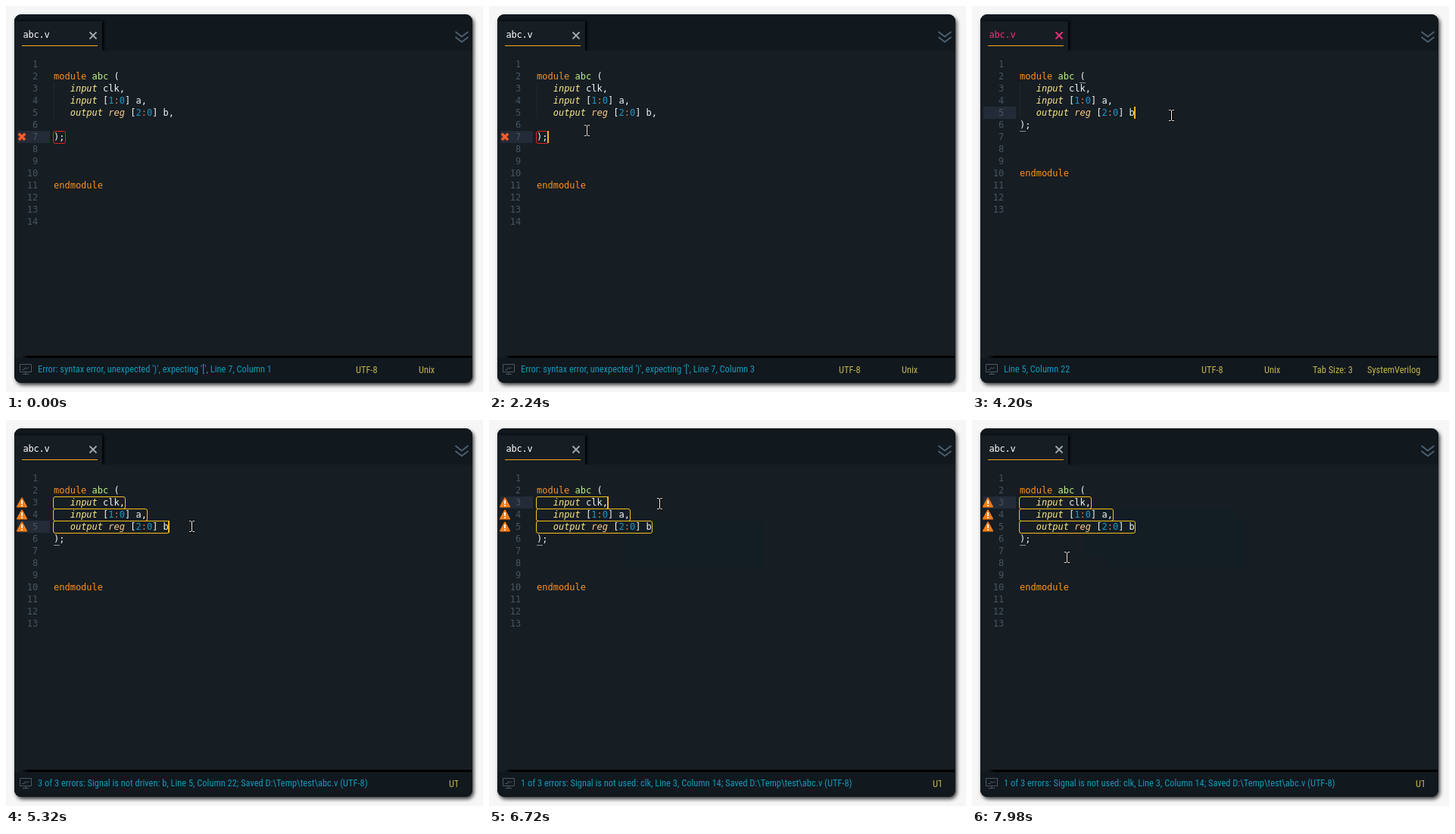
An HTML page that plays this animation: 630 px wide and 510 px high, repeating every 8 s.

```html
<!DOCTYPE html>
<html lang="en">
<head>
<meta charset="utf-8">
<title>Verilog linting in an editor</title>
<style>
html, body { margin: 0; width: 100%; height: 100%; overflow: hidden; background: #f6f6f6; }
#stage { position: relative; width: 630px; height: 510px; overflow: hidden; }
#stage * { box-sizing: border-box; }
#stage div, #stage pre, #stage svg, #bar span { position: absolute; margin: 0; }
svg { overflow: visible; }
pre, .mono { font: 12px/16px "DejaVu Sans Mono", "Liberation Mono", monospace; white-space: pre; }
#win { left: 11px; top: 11px; width: 605px; height: 487px; border-radius: 9px; background: #161d23; box-shadow: 2px 3px 5px rgba(0,0,0,.75); }
#tabs { left: 11px; top: 11px; width: 605px; height: 48px; border-radius: 9px 9px 0 0; background: #11181e; overflow: hidden; }
#tab { left: 0; top: 9px; width: 116px; height: 39px; background: #161d23; box-shadow: 2px 0 3px #000; }
#name { left: 22.5px; top: 30px; letter-spacing: -.22px; color: #fff; }
#rule { left: 21px; top: 52px; width: 100px; height: 1px; background: #f5a81c; }
#edge { left: 20px; top: 462px; width: 595px; height: 3px; background: linear-gradient(90deg, transparent, #000 10px); }
#foot { left: 11px; top: 465px; width: 605px; height: 33px; border-radius: 0 0 9px 9px; background: #11181e; }
#nums { left: 12px; top: 69px; width: 30.2px; text-align: right; color: #48555f; }
#code { left: 63px; top: 69px; color: #f4f6f5; }
#active { left: 15px; width: 43px; height: 16px; background: #222b37; }
#guide { left: 63px; top: 101px; width: 1px; height: 48px; background: repeating-linear-gradient(#2b353d 0 1px, transparent 1px 2px); }
.kw { color: #ff901e; } .id { color: #bdf08a; } .num { color: #1c97c8; } .op { color: #d97a45; }
.dir { color: #fbe88c; font-style: italic; } .reg { color: #ffc98a; font-style: italic; }
.box { left: 62px; height: 17px; border: 1px solid #f3c11c; border-radius: 3px; }
.under { width: 8px; height: 1px; background: #8d9796; }
#err .box { border-color: #e3221b; }
#caret { width: 1.5px; height: 16px; background: #f9b41d; }
.tip { height: 63px; background: #22282e; color: #f2f2f2; letter-spacing: -.22px; }
.tip b { position: absolute; left: 13px; top: 13px; }
.tip i { position: absolute; left: 23px; top: 34px; font-style: normal; }
.tip.blank { background: #1b2228; }
.tip.blank > * { display: none; }
.ghost { height: 63px; background: #121e24; }
#bar { left: 0; top: 472px; width: 597px; height: 20px; overflow: hidden; white-space: pre;
  font: 12.4px/16px "Roboto Condensed", Roboto, sans-serif; font-stretch: 75%; }
#bar.wide { font-size: 12px; letter-spacing: -.38px; }
#msg { left: 42px; color: #1299ba; }
#bar .info { top: 1px; color: #c3b451; }
</style>
</head>
<body>
<div id="stage">
  <div id="win"></div>
  <div id="tabs"><div id="tab"></div></div>
  <div id="name" class="mono">abc.v</div>
  <svg id="close" style="left:110px;top:34px" width="10" height="10" fill="none" stroke-width="1.8"><path d="M.5 .5 9.5 9.5M9.5 .5 .5 9.5"/></svg>
  <div id="rule"></div>
  <svg style="left:593px;top:33px" width="18" height="16" fill="none" stroke="#4b5f70" stroke-width="2"><path d="M.5 1 9 7.5 17.5 1M.5 8 9 14.5 17.5 8"/></svg>
  <div id="edge"></div>
  <div id="foot"></div>

  <div class="ghost" id="ghostA" style="left:178px;top:133px;width:183px"></div>
  <div class="ghost" id="ghostB" style="left:149px;top:117px;width:197px"></div>
  <div id="active"></div>
  <div id="guide"></div>
  <pre id="nums"></pre>
  <pre id="code"></pre>
  <div id="pair">
    <div class="under" style="left:142px;top:101px"></div>
    <div class="under" id="closeMark" style="left:63px"></div>
  </div>
  <div id="err">
    <svg style="left:15px;top:167px" width="12" height="12"><path d="M2 2 10 10M10 2 2 10" stroke="#a92c12" stroke-width="4.4"/><path d="M1.8 1.6 10 9.8M10.2 1.6 2 9.8" stroke="#f2602c" stroke-width="3"/></svg>
    <div class="box" style="top:165px;width:17px"></div>
  </div>
  <div id="warns"></div>
  <div id="caret"></div>
  <div class="tip mono" id="tipA" style="left:178px;top:133px;width:183px"><b>Line 3</b><i>Signal is not used: a</i></div>
  <div class="tip mono" id="tipB" style="left:149px;top:117px;width:197px"><b>Line 2</b><i>Signal is not used: clk</i></div>

  <svg style="left:18px;top:473px" width="16" height="14" fill="none" stroke="#4d5962"><path d="M.5 .5h15v10h-15zM8 10.500v3M4 13.500h8M3 7.500h3l1.500-3 1.500 2 1.500-1.500h2"/></svg>
  <div id="bar"><span id="msg"></span></div>
  <svg id="mouse" width="9" height="17" fill="none"><path id="beam" d="M1 1.500H3.500L4.500 2.500 5.500 1.500H8M4.500 2V15M1 15.500H3.500L4.500 14.500 5.500 15.500H8" stroke="#000" stroke-width="3"/><use href="#beam" style="display:none"/><path d="M1 1.500H3.500L4.500 2.500 5.500 1.500H8M4.500 2V15M1 15.500H3.500L4.500 14.500 5.500 15.500H8" stroke="#fff"/></svg>
</div>
<script>
const LOOP = 8000, STEP = 140, CHAR = 7.224;
const $ = id => document.getElementById(id);
const rowTop = line => 69 + 16 * (line - 1);
const show = (id, on) => { $(id).style.display = on ? '' : 'none'; };
const within = (t, a, b) => t >= a && t < b;

const source = ['', 'module abc (', '   input clk,', '   input [1:0] a,', '   output reg [2:0] b,',
  '', ');', '', '', '', 'endmodule', '', '', ''];
const noComma = source.map((s, i) => i === 4 ? s.slice(0, -1) : s);
const joined = noComma.filter((s, i) => i !== 5);

const classes = ['kw', 'id', 'dir', 'reg', 'num', 'op'];
const paint = s => s.replace(/(endmodule|module)|(abc)|(input|output)|(reg)|(\d)|(:)/g, (m, ...g) =>
  `<span class="${classes[g.findIndex((x, i) => i < 6 && x)]}">${m}</span>`);

const saved = '; Saved D:\\Temp\\test\\abc.v (UTF-8)';
const syntax = "Error: syntax error, unexpected ')', expecting '[', ";
// time, line, column, text before the position, text after it, x of the file info
const states = [
  [0, 7, 1, syntax, '', 462],
  [1120, 7, 3, syntax, '', 462],
  [2940, 5, 23, '', '', 303],
  [3920, 5, 22, '', '', 303],
  [4480, 5, 22, '', saved, 409],
  [4760, 5, 22, '3 of 3 errors: Signal is not driven: b, ', saved, 585],
  [5740, 4, 18, '2 of 3 errors: Signal is not used: a, ', saved, 578],
  [6720, 3, 14, '1 of 3 errors: Signal is not used: clk, ', saved, 586]
];

// time, x, y
const path = [
  [140, 592, 72], [560, 500, 145], [1120, 387, 175], [1540, 210, 233], [1960, 73, 192],
  [2240, 129, 164], [2660, 225, 147], [3360, 263, 144], [4340, 263, 144], [5320, 245, 140],
  [5740, 237, 124], [6020, 237, 123], [6160, 237, 123], [6720, 225, 110], [7280, 225, 110],
  [7840, 125, 181], [8000, 125, 181]
];
const carets = [[420, 840], [1120, 1540], [2100, 2380], [2940, 3500], [3920, 4480],
  [5040, 5460], [5740, 6300], [6720, 7420]];

const info = [['UTF-8', 0], ['Unix', 83], ['Tab Size: 3', 147], ['SystemVerilog', 219]].map(([text, dx]) => {
  const el = document.createElement('span');
  el.className = 'info';
  el.textContent = text;
  $('bar').append(el);
  return { el, dx };
});

$('warns').innerHTML = [[3, 96], [4, 125], [5, 154]].map(([line, w]) => `
  <svg style="left:14px;top:${rowTop(line) + 1}px" width="14" height="14"><path d="M7 1.500 13 12.500H1z" fill="#f57c14" stroke="#f57c14" stroke-width="2" stroke-linejoin="round"/><path d="M7 4v5M7 10.300v1.700" stroke="#fff" stroke-width="1.800"/></svg>
  <div class="box" style="top:${rowTop(line)}px;width:${w}px"></div>`).join('');

function mouseAt(t) {
  const i = Math.max(1, path.findIndex(p => p[0] > t));
  const [t0, x0, y0] = path[i - 1], [t1, x1, y1] = path[i];
  const k = (t - t0) / (t1 - t0), e = k * k * (3 - 2 * k);
  return [Math.round(x0 + (x1 - x0) * e), Math.round(y0 + (y1 - y0) * e)];
}

let lastDoc;
function setDoc(doc) {
  if (doc === lastDoc) return;
  lastDoc = doc;
  $('code').innerHTML = doc.map(paint).join('\n');
  $('nums').textContent = doc.map((s, i) => i + 1).join('\n');
}

function tip(id, t, from, to) {
  show(id, within(t, from, to));
  $(id).classList.toggle('blank', t < from + STEP || t >= to - STEP);
}

function draw(now) {
  const t = Math.floor((now % LOOP) / STEP) * STEP;
  const [, line, col, before, after, x] = states.filter(s => s[0] <= t).pop();

  setDoc(t < 3920 ? source : t < 4060 ? noComma : joined);
  $('msg').textContent = `${before}Line ${line}, Column ${col}${after}`;
  info.forEach(({ el, dx }) => { el.style.left = x + dx + 'px'; });

  const dirty = within(t, 3920, 4480);
  $('name').style.color = dirty ? '#f2307c' : '#fff';
  $('close').style.stroke = dirty ? '#f2307c' : '#a3a9ad';

  $('active').style.top = rowTop(line) + 'px';
  show('err', t < 4060);
  show('warns', t >= 4760);
  show('pair', line < 6);
  $('closeMark').style.top = (t < 4060 ? 181 : 165) + 'px';

  const blink = carets.find(([a, b]) => within(t, a, b + STEP));
  $('caret').style.cssText = `left:${Math.floor(63 + (col - 1) * CHAR)}px;top:${rowTop(line)}px;opacity:${blink ? (t < blink[1] ? 1 : .5) : 0}`;

  tip('tipA', t, 5880, 6720);
  tip('tipB', t, 6860, 7420);
  show('ghostA', t >= 6720);
  show('ghostB', t >= 7420);

  show('mouse', t >= STEP);
  const [mx, my] = mouseAt(t);
  $('mouse').style.left = mx - 4 + 'px';
  $('mouse').style.top = my - 8 + 'px';
}

draw(0);
// tighter tracking where no condensed face exists
if ($('msg').offsetWidth > 325) $('bar').classList.add('wide');

const start = performance.now();
(function frame() {
  draw(performance.now() - start);
  requestAnimationFrame(frame);
})();
</script>
</body>
</html>
```
